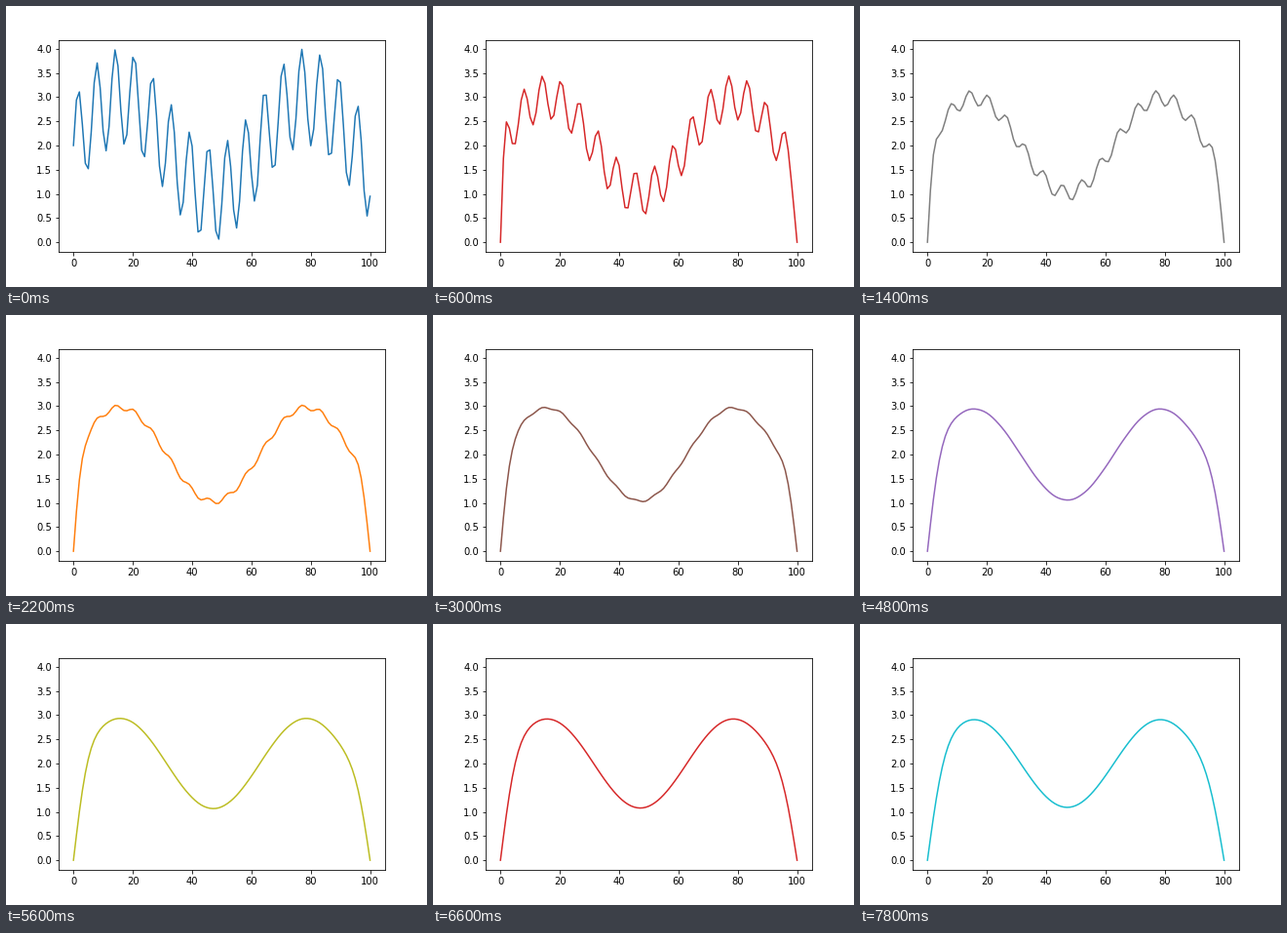
Recreate the animation shown at these times as a matplotlib script. Size 432 by 288 pixels, loop 8000 ms.

```python
import matplotlib.pyplot as plt
import numpy as np
from matplotlib.animation import ArtistAnimation

STEPS = 40
RATE = 0.25  # diffusion number per step


def diffuse(u):
    """One explicit heat-equation step with both ends held at zero."""
    new = np.zeros_like(u)
    new[1:-1] = u[1:-1] + RATE * (u[2:] - 2 * u[1:-1] + u[:-2])
    return new


fig, ax = plt.subplots(figsize=(6, 4), dpi=72)
fig.subplots_adjust(left=0.125, right=0.9, bottom=0.125, top=0.88)

x = np.arange(101)
u = 2 + np.sin(x) + np.sin(x / 10)

frames = []
for _ in range(STEPS):
    frames.append(ax.plot(x, u))  # each step takes the next cycle colour
    u = diffuse(u)

anim = ArtistAnimation(fig, frames, interval=200, repeat=True, repeat_delay=0)
plt.show()
```
